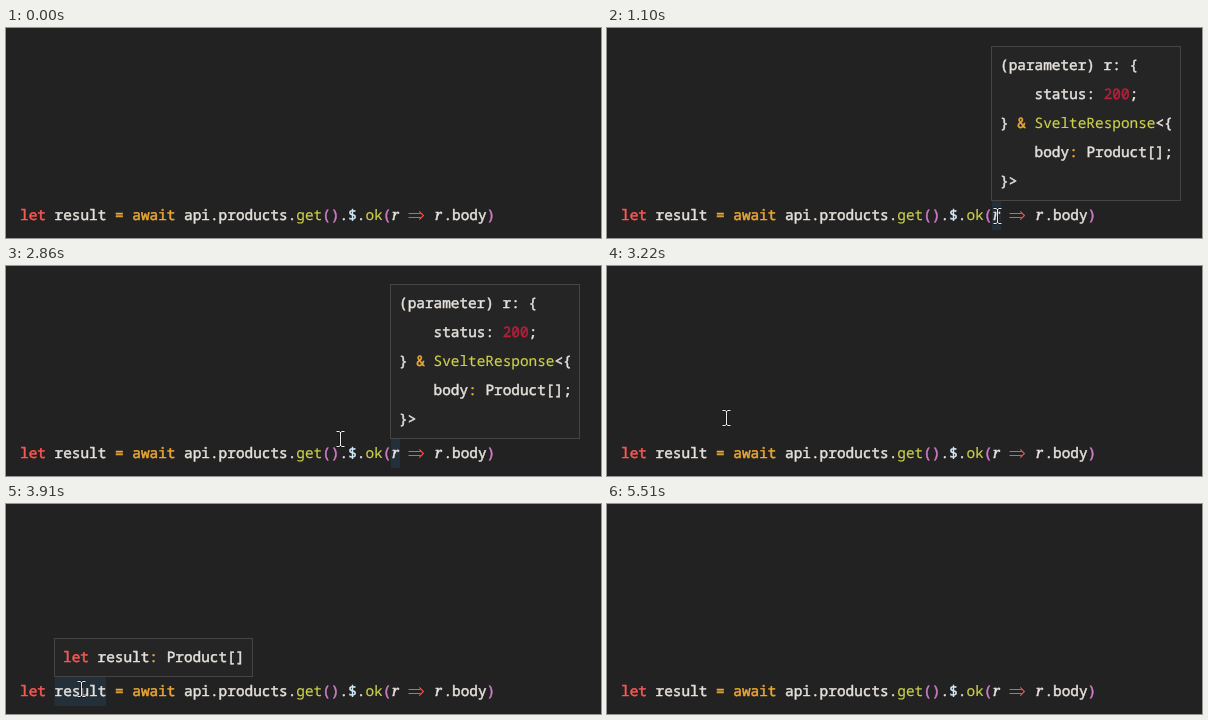
These frames come from a looping animation (595x210 px, 5.96 s). An HTML page:

```html
<!DOCTYPE html>
<html lang="en">
<head>
<meta charset="utf-8">
<title>Type hints on hover</title>
<style>
  html, body { margin: 0; width: 100%; height: 100%; overflow: hidden; background: #222; }
  svg { display: block; width: 595px; height: 210px; }

  text {
    font: 14.4px "Noto Sans Mono", "DejaVu Sans Mono", monospace;
    font-variant-ligatures: none;
    text-rendering: geometricPrecision;
    white-space: pre;
    color: #e6e1dc;
  }
  /* A thin outline gives the medium weight */
  text, tspan { fill: currentColor; stroke: currentColor; stroke-width: .5px; }
  .red { color: #fc5753; }
  .orange { color: #eba834; }
  .lime { color: #cdd24a; stroke-width: .15px; }
  .pink { color: #d07ccb; }
  .num { color: #b3213c; }
  .dollar { color: #d4edfb; }
  .param { font: italic 15px "Noto Serif", "Liberation Serif", serif; }
  .arrow { fill: none; stroke: #f2554f; stroke-width: 1.1; }

  .box { fill: #252526; stroke: #454545; }
  .mark { fill: #232f39; }

  .mark, .tip, #cursor { animation: 5960ms step-end infinite; }
  #markR { animation-name: markR; }
  #markResult { animation-name: markResult; }
  #tipR { animation-name: tipR; }
  #tipResult { animation-name: tipResult; }
  #cursor { animation-name: move; }

  @keyframes markR {
    0%, 48.657% { opacity: 0; }
    16.442% { opacity: 1; }
  }
  @keyframes markResult {
    0%, 92.449% { opacity: 0; }
    63.590% { opacity: 1; }
  }
  @keyframes tipR {
    0%, 48.657% { opacity: 0; }
    16.442% { opacity: .1; animation-timing-function: steps(3); }
    18.456% { opacity: 1; }
  }
  @keyframes tipResult {
    0%, 92.449% { opacity: 0; }
    63.590% { opacity: .1; animation-timing-function: steps(3); }
    65.603% { opacity: 1; }
  }

  /* Pointer positions advance every 40 ms */
  @keyframes move {
    0% { transform: translate(368px, 230px); }
    6.208% { transform: translate(370px, 208px); animation-timing-function: steps(4); }
    8.892% { transform: translate(382px, 196px); animation-timing-function: steps(6); }
    12.919% { transform: translate(390px, 188px); }
    45.301% { transform: translate(391px, 187px); animation-timing-function: steps(3); }
    47.315% { transform: translate(361px, 178px); animation-timing-function: steps(5); }
    50.671% { transform: translate(226px, 153px); animation-timing-function: steps(3); }
    52.684% { transform: translate(145px, 144px); animation-timing-function: steps(2); }
    54.026% { transform: translate(119px, 152px); }
    54.697% { transform: translate(110px, 160px); }
    55.369% { transform: translate(100px, 168px); animation-timing-function: steps(2); }
    56.711% { transform: translate(82px, 180px); animation-timing-function: steps(2); }
    58.053% { transform: translate(75px, 185px); }
    89.093% { transform: translate(76px, 188px); animation-timing-function: steps(3); }
    91.107%, 100% { transform: translate(88px, 230px); }
  }
</style>
</head>
<body>
<svg viewBox="0 0 595 210">
  <defs>
    <path id="beam" d="M-3.5 -7.5H-1L.5 -6.5L2 -7.5H4.5M.5 -7V7M-3.5 7.5H-1L.5 6.5L2 7.5H4.5"/>
  </defs>

  <rect id="markR" class="mark" x="385" y="173" width="9" height="29"/>
  <rect id="markResult" class="mark" x="48.5" y="173" width="51.5" height="29"/>

  <text x="14" y="192"><tspan class="red">let</tspan> result <tspan class="orange">= await</tspan> api.products.<tspan class="lime">get</tspan><tspan class="pink">()</tspan>.<tspan class="dollar">$</tspan>.<tspan class="lime">ok</tspan><tspan class="pink">(</tspan></text>
  <text class="param" x="386" y="192">r</text>
  <path class="arrow" d="M402.5 185.5H414.5M402.5 189.5H414.5M413.3 183.3L417.4 187.5L413.3 191.7"/>
  <text class="param" x="429" y="192">r</text>
  <text x="437.4" y="192">.body<tspan class="pink">)</tspan></text>

  <g id="tipR" class="tip">
    <rect class="box" x="384.5" y="18.5" width="189" height="154"/>
    <text x="393" y="42">(parameter) r: {</text>
    <text x="427.6" y="71">status: <tspan class="num">200</tspan>;</text>
    <text x="393" y="100">} <tspan class="orange">&amp;</tspan> <tspan class="lime">SvelteResponse</tspan>&lt;{</text>
    <text x="427.6" y="129">body<tspan class="orange">:</tspan> Product[];</text>
    <text x="393" y="158">}&gt;</text>
  </g>

  <g id="tipResult" class="tip">
    <rect class="box" x="48.5" y="134.5" width="198" height="38"/>
    <text x="57" y="158"><tspan class="red">let</tspan> result<tspan class="orange">:</tspan> Product[]</text>
  </g>

  <g id="cursor" fill="none">
    <use href="#beam" stroke="#111" stroke-width="2"/>
    <use href="#beam" stroke="#eee"/>
  </g>
</svg>
</body>
</html>
```
